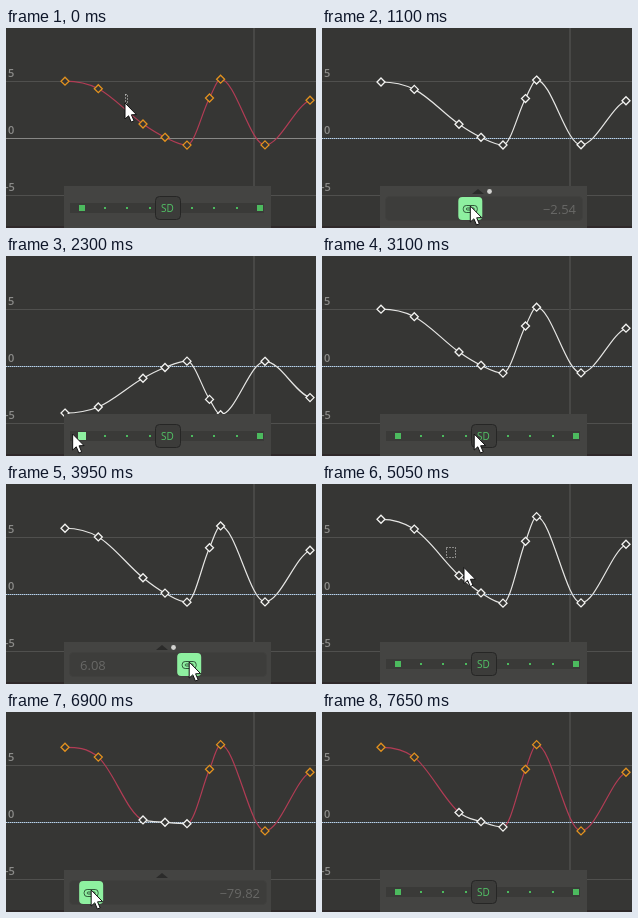
Animation of 310x200 px, one loop 7900 ms. Source, as an HTML page with a canvas:

```html
<!DOCTYPE html>
<html lang="en">
<head>
<meta charset="utf-8">
<title>Scale slider on an animation curve</title>
<style>
  html, body { margin: 0; width: 100%; height: 100%; overflow: hidden; background: #363634; }
  canvas { display: block; width: 310px; height: 200px; }
</style>
</head>
<body>
<canvas id="stage" width="310" height="200"></canvas>
<script>
const ctx = document.getElementById('stage').getContext('2d');
const LOOP = 7900, STEP = 50;
const ZERO = 110.5, MID = 162, REACH = 86, ROW = 178;
const BG = '#363634', GREEN = '#4cba5e', BRIGHT = '#8ef0a0';
const FONT = '"Open Sans", "Noto Sans", sans-serif';
const RESTORE = 2750, SELECT_ALL = 250, SELECT_SOME = 5350;

// Keys of the curve: x, offset from the zero line
const KEYS = [[59, -57.3], [92.3, -49.8], [137, -14.5], [159, -1.2], [181, 6.6],
              [203.5, -40.5], [214.6, -59.3], [259, 6.4], [304, -38.3]];

// Slider drags: time, distance from the middle
const DRAGS = [
  { from: 900, to: 2200, way: [[900, 0], [1100, -13.7], [1600, -86], [1800, -102], [2000, -102], [2050, -99]] },
  { from: 3350, to: 4650, way: [[3350, 0], [3700, 53], [3900, 34], [3950, 21.2], [4000, 17],
                                [4200, 69.5], [4350, 69.5], [4600, 48.1]] },
  { from: 5800, to: 7400, way: [[5800, 0], [6000, 52], [6100, 50], [6200, 33.4], [6350, -4],
                                [6700, -74], [6850, -80], [7150, -61], [7300, -59]] }
];

// Free pointer moves: time, x, y
const MOVES = [
  [0, 119, 75], [200, 137, 92], [750, MID, ROW],
  [2150, 63, ROW], [2600, 74, ROW], [2700, 74, ROW], [3150, MID, ROW],
  [4650, 210, ROW], [4950, 124, 63], [5150, 160, 104], [5200, 160, 104],
  [5400, 192, 137], [5500, 192, 137], [5750, MID, ROW],
  [7400, 103, ROW], [7600, 100, 204]
];

const PATH = DRAGS.flatMap(g => g.way.map(([t, d]) => [t, MID + d, ROW]))
  .concat(MOVES).sort((a, b) => a[0] - b[0]);

function pointer(t) {
  let i = 1;
  while (i < PATH.length - 1 && PATH[i][0] < t) i++;
  const [t0, x0, y0] = PATH[i - 1], [t1, x1, y1] = PATH[i];
  const p = Math.min(1, Math.max(0, (t - t0) / (t1 - t0)));
  return { x: x0 + (x1 - x0) * p, y: y0 + (y1 - y0) * p };
}

// Quadratic response, steep overshoot past the end of the track
function percent(x) {
  const d = x - MID, a = Math.abs(d);
  const v = a <= REACH ? 100 * (a / REACH) ** 2 : Math.min(200, 100 + (a - REACH) * 6.25);
  return Math.sign(d) * v;
}

// The curve trails the pointer by one step and keeps its last pose
function factor(t, { from, to, way }) {
  if (t <= from) return 1;
  if (t >= to) return 1 + percent(MID + way[way.length - 1][1]) / 100;
  return 1 + percent(pointer(t - STEP).x) / 100;
}

const inPart = i => i >= 2 && i <= 4;

function isSelected(i, t) {
  return t >= SELECT_ALL && (t < SELECT_SOME || inPart(i));
}

function pose(t) {
  const all = t < RESTORE ? factor(t, DRAGS[0]) : factor(t, DRAGS[1]);
  const part = factor(t, DRAGS[2]);
  return KEYS.map(([x, dy], i) => [x, ZERO + dy * all * (inPart(i) ? part : 1)]);
}

// Auto tangents: flat at extremes, clamped average elsewhere
function slopes(pts) {
  const sec = pts.slice(1).map((p, i) => (p[1] - pts[i][1]) / (p[0] - pts[i][0]));
  return pts.map((p, i) => {
    if (i === 0) return 0;
    const a = sec[i - 1], b = sec[i];
    if (i === pts.length - 1) return a * 0.4;
    if (a * b <= 0) return 0;
    return Math.sign(a) * Math.min(Math.abs(a + b) / 2, 3 * Math.abs(a), 3 * Math.abs(b));
  });
}

function rect(x, y, w, h, color) {
  ctx.fillStyle = color;
  ctx.fillRect(x, y, w, h);
}

function round(x, y, w, h, r, fill, stroke) {
  ctx.beginPath();
  ctx.roundRect(x, y, w, h, r);
  if (fill) { ctx.fillStyle = fill; ctx.fill(); }
  if (stroke) { ctx.strokeStyle = stroke; ctx.lineWidth = 1; ctx.stroke(); }
}

function text(str, x, y, font, color, align = 'left') {
  ctx.font = font + ' ' + FONT;
  ctx.fillStyle = color;
  ctx.textAlign = align;
  ctx.fillText(str, x, y);
}

function drawGrid(t) {
  rect(0, 0, 310, 200, BG);
  rect(0, 53, 310, 1, '#50504e');
  rect(0, 167, 310, 1, '#50504e');
  rect(247, 0, 2, 200, '#484846');
  rect(0, 198, 310, 2, '#2f292a');
  if (t < SELECT_ALL) {
    rect(0, 110, 310, 1, '#878785');
  } else {
    rect(0, 110, 310, 1, '#66809a');
    for (let x = 0; x < 310; x += 2) rect(x, 110, 1, 1, '#c3d2e0');
  }
  text('5', 2, 49, '600 11px', '#8c8c8a');
  text('0', 2, 106, '600 11px', '#8c8c8a');
  text('-5', -1, 163, '600 11px', '#8c8c8a');
}

function drawCurve(t) {
  const pts = pose(t), m = slopes(pts);
  ctx.lineWidth = 1.2;
  for (let i = 0; i < pts.length - 1; i++) {
    const [x0, y0] = pts[i], [x1, y1] = pts[i + 1], h = (x1 - x0) / 3;
    ctx.beginPath();
    ctx.moveTo(x0, y0);
    ctx.bezierCurveTo(x0 + h, y0 + m[i] * h, x1 - h, y1 - m[i + 1] * h, x1, y1);
    ctx.strokeStyle = isSelected(i, t) && isSelected(i + 1, t) ? '#e6e6e4' : '#b23c55';
    ctx.stroke();
  }
  ctx.lineWidth = 1.3;
  pts.forEach(([x, y], i) => {
    ctx.beginPath();
    ctx.moveTo(x, y - 4);
    ctx.lineTo(x + 4, y);
    ctx.lineTo(x, y + 4);
    ctx.lineTo(x - 4, y);
    ctx.closePath();
    ctx.fillStyle = BG;
    ctx.fill();
    ctx.strokeStyle = isSelected(i, t) ? '#f4f4f2' : '#e3921f';
    ctx.stroke();
  });
}

function drawMarquee(t) {
  let x, y, to;
  if (t < SELECT_ALL) { x = 121; y = 66; to = pointer(t); }
  else if (t >= 5000 && t < SELECT_SOME) { x = 124; y = 63; to = pointer(t - STEP); }
  else return;
  ctx.setLineDash([1, 2]);
  ctx.strokeStyle = '#dcdcda';
  ctx.lineWidth = 1;
  ctx.strokeRect(x + 0.5, y + 0.5, Math.round(to.x - x), Math.round(to.y - y));
  ctx.setLineDash([]);
}

function drawRest(mouse) {
  rect(64, 175, 194, 10, '#3a3a38');
  for (const side of [-1, 1])
    for (let k = 0; k < 3; k++)
      rect(Math.round(MID + 2.5 + side * (21 + k * 22.5)) - 1, 179, 2, 2, GREEN);
  const hover = mouse.y > 174 && mouse.x > 66 && mouse.x < 84;
  if (hover) rect(72, 176, 8, 8, BRIGHT);
  else rect(73, 177, 6, 6, GREEN);
  rect(251, 177, 6, 6, GREEN);
  round(149.5, 168.5, 25, 23, 4, '#3c3c3a', '#262625');
  text('SD', MID - 0.5, 184, '10px', '#52c466', 'center');
}

function drawDrag(mouse, overshoot) {
  round(63.5, 168.5, 197, 24, 4, '#3d3d3b', '#40403e');
  const v = percent(mouse.x);
  const label = (v < 0 ? '\u2212' : '') + Math.abs(v).toFixed(2);
  if (v < 0) text(label, 254, 186, '13px', '#686866', 'right');
  else text(label, 74, 186, '13px', '#686866');

  ctx.beginPath();
  ctx.moveTo(150, 166);
  ctx.lineTo(156, 161);
  ctx.lineTo(162, 166);
  ctx.fillStyle = '#2b2b2a';
  ctx.fill();
  if (overshoot) {
    ctx.beginPath();
    ctx.arc(167.5, 163.5, 2.4, 0, 7);
    ctx.fillStyle = '#d2d2d0';
    ctx.fill();
  }

  const x = Math.min(MID + REACH, Math.max(MID - REACH, mouse.x));
  round(x - 12, 169, 24, 23, 4, BRIGHT);
  round(x - 7, 177.5, 14, 7, 3, null, '#31583a');
  round(x - 4, 180, 8, 2, 1, null, '#31583a');
}

function drawPanel(t, mouse) {
  rect(58, 158, 207, 42, '#444442');
  const n = DRAGS.findIndex(({ from, to }) => t >= from && t < to);
  if (n < 0) drawRest(mouse);
  else drawDrag(mouse, n < 2);
}

const ARROW = new Path2D('M0 0V16L3.6 12.8L6.2 19L9 17.8L6.4 11.8L11.4 11.6Z');

function drawPointer({ x, y }) {
  ctx.save();
  ctx.translate(x, y);
  ctx.lineJoin = 'round';
  ctx.fillStyle = '#fff';
  ctx.fill(ARROW);
  ctx.strokeStyle = '#111';
  ctx.lineWidth = 1;
  ctx.stroke(ARROW);
  ctx.restore();
}

const start = performance.now();

function frame() {
  const now = Math.max(0, performance.now() - start) % LOOP;
  const t = Math.floor(now / STEP) * STEP;
  const mouse = pointer(t);
  drawGrid(t);
  drawCurve(t);
  drawMarquee(t);
  drawPanel(t, mouse);
  drawPointer(mouse);
  requestAnimationFrame(frame);
}
frame();
</script>
</body>
</html>
```
